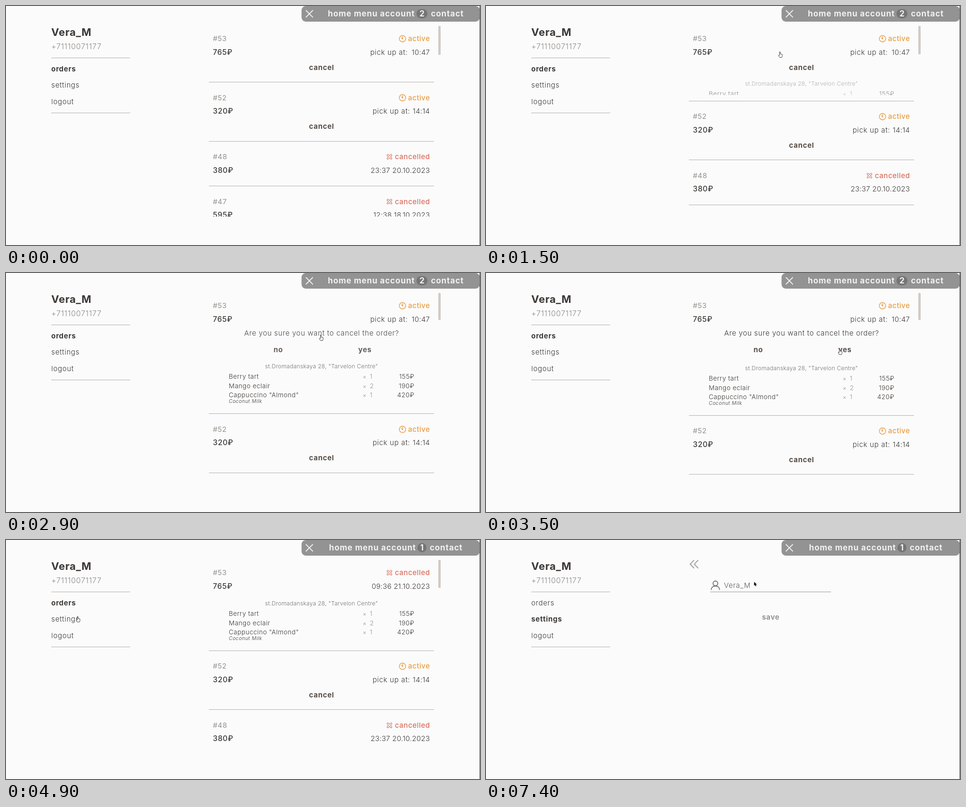
Write an HTML page with a canvas that moves like this. It is 1000 px wide and 504 px high and loops after 8000 ms.

```html
<!DOCTYPE html>
<html lang="en">
<head>
<meta charset="utf-8">
<title>Order account page</title>
<style>
  html, body { margin: 0; width: 100%; height: 100%; overflow: hidden; background: #fbfbfb; }
  canvas { display: block; width: 100vw; height: 100vh; }
</style>
</head>
<body>
<canvas id="stage"></canvas>
<script>
const W = 1000, H = 504, LOOP = 8000, STEP = 100;
const canvas = document.getElementById('stage');
const ctx = canvas.getContext('2d');
const dpr = window.devicePixelRatio || 1;
canvas.width = W * dpr;
canvas.height = H * dpr;

const BG = '#fbfbfb', INK = '#3b3836', SOFT = '#96918d', RULE = '#b4aea9';
const ORANGE = '#eb9c44', RED = '#d9705f';
const USER = 'Vera_M', PHONE = '+71110071177';
const ADDRESS = 'st.Dromadanskaya 28, "Tarvelon Centre"';

// name: [weight and size, letter spacing]
const STYLES = {
  title: ['700 22px', 0.6],
  nav: ['700 17px', 0.85],
  bold: ['700 15px', 0.7],
  mid: ['500 15px', 0.5],
  sum: ['500 15.5px', 0.7],
  body: ['400 15px', 0.6],
  light: ['300 15px', 0.65],
  date: ['300 15px', 0.25],
  phone: ['300 16px', 0.75],
  item: ['300 13.5px', 0.5],
  small: ['300 12px', 0.3],
  note: ['italic 300 10.5px', 0.5]
};

const orders = [
  { id: '#53', sum: '765₽', pick: '10:47', date: '09:36 21.10.2023' },
  { id: '#52', sum: '320₽', pick: '14:14' },
  { id: '#48', sum: '380₽', date: '23:37 20.10.2023' },
  { id: '#47', sum: '595₽', date: '12:38 18.10.2023' }
];
const items = [
  ['Berry tart', '1', '155₽'],
  ['Mango eclair', '2', '190₽'],
  ['Cappuccino "Almond"', '1', '420₽']
];

// start time, number of steps, target x, target y
const moves = [
  [500, 5, 620, 97],
  [2000, 4, 664, 131],
  [3100, 5, 746, 160.5],
  [4400, 6, 151, 161.5],
  [6000, 5, 566, 89]
];
const ENTRY = [712, 52];

const clamp = v => Math.max(0, Math.min(1, v));
const mix = (a, b, p) => a + (b - a) * p;
const steps = (t, start, n) => clamp((Math.floor((t - start) / STEP) + 1) / n);
const easeOut = p => 1 - Math.pow(1 - p, 1.7);
const smooth = p => p * p * (3 - 2 * p);

function text(str, x, y, style, color = INK, align = 'left') {
  const [font, gap] = STYLES[style];
  ctx.font = font + ' Inter, "Open Sans", sans-serif';
  ctx.letterSpacing = gap + 'px';
  ctx.textAlign = align;
  ctx.fillStyle = color;
  const tail = align === 'right' ? gap : align === 'center' ? gap / 2 : 0;
  ctx.fillText(str, x + tail, y);
}

function rule(x1, x2, y, color = RULE) {
  ctx.fillStyle = color;
  ctx.fillRect(x1, Math.floor(y), x2 - x1, 1);
}

function box(x, y, w, h, r, color) {
  ctx.fillStyle = color;
  ctx.beginPath();
  ctx.roundRect(x, y, w, h, r);
  ctx.fill();
}

function lines(color, width, ...paths) {
  ctx.strokeStyle = color;
  ctx.lineWidth = width;
  ctx.lineCap = ctx.lineJoin = 'round';
  ctx.beginPath();
  for (const p of paths) {
    ctx.moveTo(p[0], p[1]);
    for (let i = 2; i < p.length; i += 2) ctx.lineTo(p[i], p[i + 1]);
  }
  ctx.stroke();
}

function faded(alpha, draw) {
  if (alpha <= 0) return;
  ctx.save();
  ctx.globalAlpha *= Math.min(1, alpha);
  draw();
  ctx.restore();
}

function crossLines(x, y, r, color, width) {
  lines(color, width, [x - r, y - r, x + r, y + r], [x + r, y - r, x - r, y + r]);
}

function header(count) {
  ctx.fillStyle = '#555';
  ctx.fillRect(999, 0, 1, H);
  box(623.5, 0, 376, 33, 9, '#939393');
  crossLines(640, 16.5, 7, '#f0f0f0', 1.8);
  const shift = count === 1 ? 2.5 : 0;
  const color = '#f1f1f1', y = 21.5;
  text('home', 679 + shift, y, 'nav', color);
  text('menu', 734 + shift, y, 'nav', color);
  text('account', 789 + shift, y, 'nav', color);
  text('contact', 965 - shift, y, 'nav', color, 'right');
  const w = count === 1 ? 19 : 23;
  box(877.5 - w / 2, 6.5, w, 19.5, 9.5, '#757575');
  text(String(count), 877.5, 22, 'nav', color, 'center');
}

function sidebar(tab) {
  text(USER, 95.5, 62.5, 'title');
  text(PHONE, 95.5, 90.5, 'phone', '#8b8886');
  rule(95.5, 262, 109);
  ['orders', 'settings', 'logout'].forEach((name, i) => {
    text(name, 95.5, 137.5 + i * 34.7, name === tab ? 'bold' : 'light');
  });
  rule(95.5, 262, 225.6);
}

function activeMark(y) {
  text('active', 894, y + 5.5, 'mid', ORANGE, 'right');
  ctx.strokeStyle = ORANGE;
  ctx.lineWidth = 1.4;
  ctx.beginPath();
  ctx.arc(836.5, y + 0.5, 6.8, 0, Math.PI * 2);
  ctx.stroke();
  lines(ORANGE, 1.4, [834, y - 1.5, 836.7, y + 1.2, 836.7, y - 3.8]);
}

function cancelledMark(y) {
  text('cancelled', 894, y + 5.5, 'mid', RED, 'right');
  crossLines(809, y + 0.5, 3.6, RED, 4.2);
  crossLines(809, y + 0.5, 3.6, BG, 2);
}

function details(y) {
  text(ADDRESS, 665.5, y + 4, 'small', '#77726f', 'center');
  items.forEach(([name, qty, price], i) => {
    const base = y + 26 + i * 19.5;
    text(name, 470, base, 'item');
    text('×', 752.5, base, 'small', SOFT);
    text(qty, 767.5, base, 'item', SOFT);
    text(price, 861, base, 'item', INK, 'right');
  });
  text('Coconut Milk', 470, y + 77, 'note');
}

// Draws one card and returns the y of its lower rule.
function card(order, top, s) {
  const active = order.pick && !s.cancelled;
  text(order.id, 436.5, top + 38, 'body', SOFT);
  text(order.sum, 436.5, top + 66.5, 'sum');
  (active ? activeMark : cancelledMark)(top + 32.5);
  if (active) {
    text('pick up at:', order.pick === '10:47' ? 847 : 852, top + 66.5, 'light', INK, 'right');
    text(order.pick, 894, top + 66.5, 'date', INK, 'right');
  } else {
    text(order.date, 894, top + 66.5, 'date', INK, 'right');
  }
  const ask = s.ask || 0, gone = s.gone || 0, open = s.open || 0;
  if (order.pick) {
    faded(1 - ask * 1.5, () => text('cancel', 665.5, top + 98.5, 'bold', '#544b45', 'center'));
    faded(ask * (1 - gone * 1.8), () => {
      text('Are you sure you want to cancel the order?', 665.5, top + 96, 'light', INK, 'center');
      text('no', 574, top + 130.5, 'bold', '#544b45', 'center');
      text('yes', 757, top + 130.5, 'bold', '#544b45', 'center');
    });
  }
  const shift = order.pick ? mix(37 * ask, -30, gone) : -30;
  const bottom = top + 124.5 + shift + 102.8 * open;
  if (open) {
    faded(open * 1.4, () => {
      ctx.beginPath();
      ctx.rect(428, top + 112 + shift, 475, bottom - 12.5 - top - 112 - shift);
      ctx.clip();
      details(top + 128 + shift);
    });
  }
  rule(428, 903, bottom);
  return bottom;
}

function ordersPage(t) {
  const first = {
    open: easeOut(steps(t, 1500, 4)),
    ask: easeOut(steps(t, 2700, 4)),
    gone: easeOut(steps(t, 3900, 4)),
    cancelled: t >= 3900
  };
  ctx.save();
  ctx.beginPath();
  ctx.rect(420, 36, 490, 408);
  ctx.clip();
  let top = 36;
  orders.forEach((order, i) => { top = card(order, top, i ? {} : first); });
  ctx.restore();
  const extra = 102.8 * first.open + mix(37 * first.ask, -30, first.gone);
  box(912, 42, 5, 61 - extra * 0.029, 1.5, '#d0cbc7');
}

function backArrow() {
  lines('#aaa6a4', 2.2,
    [438.5, 43, 430.8, 51, 438.5, 59],
    [447.2, 43, 439.5, 51, 447.2, 59]);
}

function settingsMenu() {
  text('change name', 473, 85.5, 'light');
  rule(473, 644, 104.5, '#a39e9a');
  text('change password', 473, 133.5, 'light');
}

function nameForm() {
  ctx.strokeStyle = '#75706d';
  ctx.lineWidth = 1.8;
  ctx.beginPath();
  ctx.arc(484, 91.5, 5, 0, Math.PI * 2);
  ctx.moveTo(475.2, 104.5);
  ctx.bezierCurveTo(475.8, 94.5, 492.2, 94.5, 492.8, 104.5);
  ctx.stroke();
  text(USER, 502, 101.3, 'light', '#625e5b');
  rule(473, 728, 109, '#9c9793');
  text('save', 600.5, 168, 'bold', '#989390', 'center');
}

function shape(points, fill, stroke) {
  ctx.beginPath();
  points.forEach(([x, y]) => ctx.lineTo(x, y));
  ctx.closePath();
  ctx.fillStyle = fill;
  ctx.fill();
  ctx.strokeStyle = stroke;
  ctx.lineWidth = 0.9;
  ctx.lineJoin = 'round';
  ctx.stroke();
}

const HAND = [[-1, 0], [1, 0], [1, 4], [5, 5], [5, 9], [4, 11.5], [-0.5, 11.5], [-3, 7.5], [-2.2, 6.3], [-1, 7]];
const ARROW = [[0, 0], [0, 6.5], [1.5, 5.3], [2.9, 8], [3.9, 7.5], [2.6, 4.9], [4.5, 4.7]];

function pointer(t) {
  if (t < moves[0][0]) return;
  let [x, y] = ENTRY, moving = false;
  for (const [start, n, tx, ty] of moves) {
    if (t < start) break;
    const p = steps(t, start, n);
    moving = p < 1;
    x = mix(x, tx, smooth(p));
    y = mix(y, ty, smooth(p));
  }
  const hand = t < 5400 ? x > 428 || !moving : t >= 6400 && t < 6900;
  ctx.save();
  ctx.translate(x, y);
  if (hand) shape(HAND, '#fff', '#333');
  else shape(ARROW, '#111', '#111');
  ctx.restore();
}

function draw(t) {
  ctx.setTransform(dpr, 0, 0, dpr, 0, 0);
  ctx.globalAlpha = 1;
  ctx.fillStyle = BG;
  ctx.fillRect(0, 0, W, H);
  const toSettings = steps(t, 5400, 5), toForm = steps(t, 6900, 6);
  sidebar(t < 5400 ? 'orders' : 'settings');
  faded(1 - toSettings * 2, () => ordersPage(t));
  faded(toSettings * 2 - 1, () => {
    backArrow();
    faded(1 - toForm * 2, settingsMenu);
    faded(toForm * 2 - 1, nameForm);
  });
  header(t < 3900 ? 2 : 1);
  pointer(t);
}

const began = performance.now();
function tick() {
  const t = (performance.now() - began) % LOOP;
  draw(Math.floor(t / STEP) * STEP);
  requestAnimationFrame(tick);
}
tick();
</script>
</body>
</html>
```
